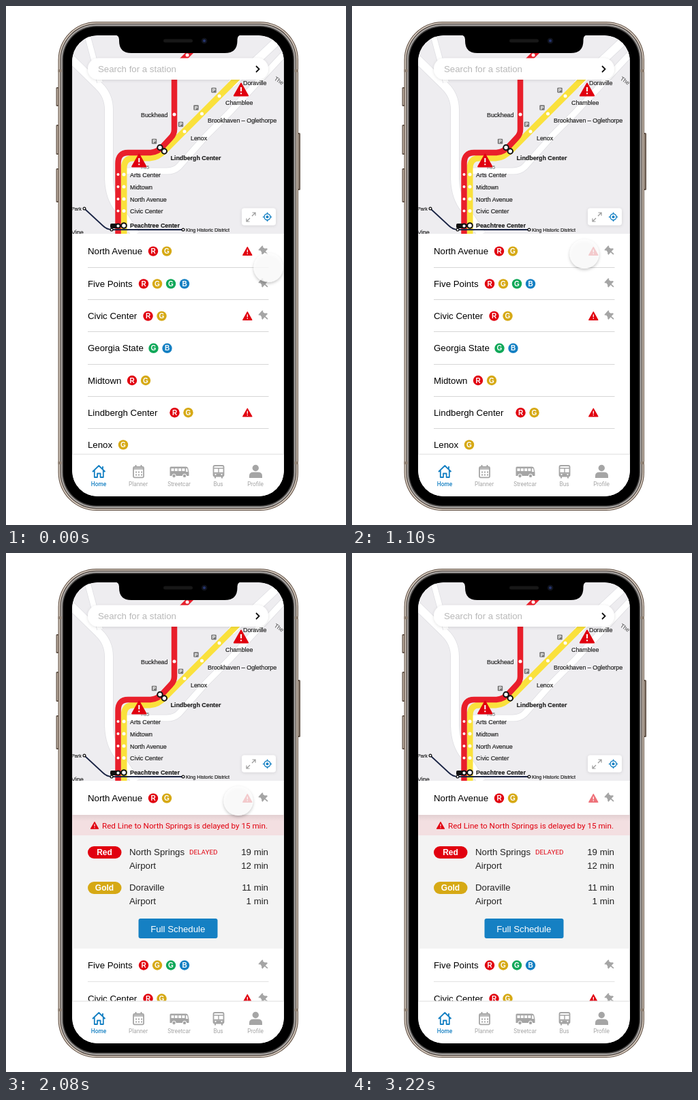
Write an HTML page that moves like this. It is 499 px wide and 761 px high and loops after 3800 ms.

```html
<!DOCTYPE html>
<html lang="en">
<head>
<meta charset="utf-8">
<title>Station list</title>
<style>
html, body { margin: 0; width: 100%; height: 100%; overflow: hidden; background: #fff; }
svg { display: block; width: 499px; height: 761px; font-family: "Liberation Sans", Arial, sans-serif; }
.ui { font-size: 13.25px; }
.map { font-size: 8.9px; fill: #222; stroke: #222; stroke-width: .2px; }
.b { font-weight: bold; }
.mid { text-anchor: middle; }
.end { text-anchor: end; }
.rb { font-family: Roboto, sans-serif; }
</style>
</head>
<body>
<svg id="stage" viewBox="0 0 499 761"></svg>
<script>
const RED = '#e1000f', GOLD = '#d6a915', GREEN = '#10a859', BLUE = '#1580c3', GREY = '#a5a5a5';
const LINE = { R: ['R', RED], Y: ['G', GOLD], G: ['G', GREEN], B: ['B', BLUE] };

const text = (x, y, s, cls = 'ui', attr = '') => `<text x="${x}" y="${y}" class="${cls}" ${attr}>${s}</text>`;
const rect = (x, y, w, h, r, fill, attr = '') =>
  `<rect x="${x}" y="${y}" width="${w}" height="${h}" rx="${r}" fill="${fill}" ${attr}/>`;
const dot = (x, y, r, fill, attr = '') => `<circle cx="${x}" cy="${y}" r="${r}" fill="${fill}" ${attr}/>`;
const path = (d, stroke, w, attr = '') =>
  `<path d="${d}" fill="none" stroke="${stroke}" stroke-width="${w}" ${attr}/>`;
const shape = (d, fill, attr = '') => `<path d="${d}" fill="${fill}" ${attr}/>`;

const alertIcon = (x, y, k = 1, attr = '') => `<g transform="translate(${x} ${y}) scale(${k})" ${attr}>
  <path d="M0-6 6.6 5.7H-6.6Z" fill="${RED}" stroke="${RED}" stroke-width="1.2" stroke-linejoin="round"/>
  <path d="M0-2.4V1.7M0 2.9V4.3" stroke="#fff" stroke-width="1.3"/></g>`;
const pin = y => shape('M-4.5-7.5h9v2.2h-1.4l.7 4q2.4 1.2 2.4 3.7H.9V7L0 8.5-.9 7V2.4H-6.2q0-2.5 2.4-3.7l.7-4h-1.4Z',
  GREY, `transform="translate(378.5 ${y - .5}) rotate(-48) scale(.94)"`);
const badge = (x, y, key) => dot(x, y, 7.2, LINE[key][1]) +
  text(x, y + 3.6, LINE[key][0], 'b mid', 'font-size="10" fill="#fff"');
const rule = (y, color = '#d6d6d6') => path(`M120 ${y}H385.5`, color, 1);

function row(y, name, x, lines, warn, pinned) {
  return text(120, y + 4.6, name) +
    [...lines].map((key, i) => badge(x + i * 20, y, key)).join('') +
    (warn ? alertIcon(354.3, y) : '') + (pinned ? pin(y) : '');
}

function mapView() {
  const road = (d, w) => path(d, '#dedee2', w + 1.5) + path(d, '#fff', w);
  const red = 'M272 66 253 85Q247 91 247 99V181Q247 188 242 193L230 206Q222 214.5 212 215H179Q164.5 215 164.5 231V335';
  const gold = 'M345 100 235 210Q223 222.5 211 223H187Q173 223 173 239V335';
  const labels = [
    [198, 163, 'Buckhead'], [348, 116, 'Doraville'], [322, 145, 'Chamblee'],
    [296, 171, 'Brookhaven – Oglethorpe'], [271, 196.5, 'Lenox'], [182, 250.5, 'Arts Center'],
    [182, 268.5, 'Midtown'], [182, 286.5, 'North Avenue'], [182, 304, 'Civic Center'], [96, 335, 'Vine']
  ];
  const ring = (x, y, r, w) => dot(x, y, r, '#fff', `stroke="#111" stroke-width="${w}"`);
  const parking = ([x, y]) => rect(x - 3.7, y - 3.7, 7.4, 7.4, 1, '#777') +
    text(x, y + 2.5, 'P', 'b mid', 'font-size="7" fill="#fff"');
  return rect(97, 43, 311, 292, 0, '#eeedf0') +
    road('M90 72 136 117Q151 131 151 152V250Q151 280 166 298L190 335', 12) +
    road('M118 38 138 112', 8) +
    road('M175 242H236Q248 242 255 234L294 190Q310 174 326 158L412 66', 9) +
    road('M330 115 410 40', 12) +
    path(gold, '#fae13c', 9) + path(red, '#e91f2b', 8.5) +
    [[247, 159], [313, 132], [287.5, 158], [262, 184], [266, 72]].map(p => dot(...p, 2.5, '#fff')).join('') +
    [247, 265, 283, 300.5].map(y => dot(164.5, y, 2, '#fff') + dot(173, y, 2.5, '#fff')).join('') +
    [[305, 123.5], [279, 149], [256.5, 173.5], [217.5, 198.5]].map(parking).join('') +
    path('M228 209 231 212', '#111', 4) + ring(226, 207.5, 3.7, 2) + ring(232.3, 213, 3.7, 2) +
    path('M115 297 142 322Q148 328 156 328H260', '#1b2545', 1.8) +
    rect(153, 319, 13, 7, 2, '#111') + path('M164 322H173', '#111', 4) +
    ring(164.5, 322.5, 3, 1.8) + ring(173, 322, 3.8, 2) +
    [[115, 297], [155, 328], [260, 328]].map(p => ring(...p, 1.9, 1.2)).join('') +
    labels.map(a => text(...a, 'map')).join('') +
    text(241.5, 226, 'Lindbergh Center', 'map b') + text(182, 325, 'Peachtree Center', 'map b') +
    text(264, 331, 'King Historic District', 'map', 'style="font-size:7.15px"') +
    text(96, 300, 'Park', 'map', 'style="font-size:7.2px"') +
    text(198, 239, 'I-85', '', 'font-size="7" fill="#666"') +
    text(393, 108, 'The P', '', 'font-size="8.5" fill="#444" transform="rotate(33 393 108)"') +
    alertIcon(345, 122.7, 1.55) + alertIcon(195.3, 226.7, 1.55) +
    rect(346, 296.5, 50, 25, 4, '#fff', 'filter="url(#soft)"') +
    path('M361 308 366 303M361.5 303H366V307.5M358 311 353 316M353 311.5V316H357.5', '#999', 1.2) +
    path('M383.5 302.5V305M383.5 313.5V316M376.8 309.3H379.3M387.7 309.3H390.2', BLUE, 1.3) +
    dot(383.5, 309.3, 4.5, 'none', `stroke="${BLUE}" stroke-width="1.4"`) + dot(383.5, 309.3, 2, BLUE) +
    rect(120, 76.5, 265, 31.5, 15.7, '#fff', 'filter="url(#soft)"') +
    text(135, 97, 'Search for a station', 'ui', 'fill="#b8b8b8"') +
    path('M367 88 371.5 92.5 367 97', '#111', 1.8);
}

function closedList() {
  const rows = [
    ['Five Points', 202, 'RYGB', 0, 1], ['Civic Center', 208.5, 'RY', 1, 1], ['Georgia State', 216.5, 'GB'],
    ['Midtown', 185, 'RY'], ['Lindbergh Center', 247.5, 'RY', 1], ['Lenox', 172, 'Y']
  ];
  return rows.map((r, i) => row(407.4 + 47.2 * i, ...r) + (i < 5 ? rule(430.5 + Math.round(47.3 * i)) : '')).join('') +
    rule(383.5);
}

function openList() {
  const pill = (y, s, fill) => rect(120, y, 49.5, 18, 9, fill) +
    text(144.5, y + 13.3, s, 'b mid', 'font-size="12" fill="#fff"');
  const trains = [[443, 'North Springs', 19], [463, 'Airport', 12], [494.5, 'Doraville', 11], [514.5, 'Airport', 1]];
  return rect(97, 384, 311, 196, 0, '#f3f3f3') + rect(97, 384, 311, 30, 0, '#f3dfe1') +
    rect(97, 384, 311, 9, 0, 'url(#shade)') +
    alertIcon(130, 399.5, .85) +
    text(141, 403.5, 'Red Line to North Springs is delayed by 15 min.', 'rb', `font-size="11.65" fill="${RED}"`) +
    pill(430, 'Red', RED) + pill(482, 'Gold', GOLD) +
    trains.map(([y, to, min]) => text(181, y, to, 'ui', 'fill="#222"') + text(385, y, min + ' min', 'ui end', 'fill="#222"')).join('') +
    text(269, 442, 'DELAYED', 'rb', `font-size="9.9" fill="${RED}"`) +
    rect(194.5, 536, 116, 29, 3, BLUE) + text(252.3, 556, 'Full Schedule', 'ui mid', 'fill="#fff"') +
    row(604.5, 'Five Points', 202, 'RYGB', 0, 1) + rule(628.5, '#e2e2e2') +
    row(653.5, 'Civic Center', 208.5, 'RY', 1, 1);
}

function tabBar() {
  const tabs = [[136, 'Home'], [194, 'Planner'], [254, 'Streetcar'], [311.5, 'Bus'], [366, 'Profile']];
  return rect(97, 657, 311, 63, 0, '#fff') + rect(97, 656.5, 311, 1.5, 0, '#e9e9e9') +
    path('M127 683 136.3 674 145.5 683M129.8 681V691H134V685.5H138.6V691H142.8V681M142 675V678.5', BLUE, 1.8, 'stroke-linejoin="round"') +
    rect(187, 676, 15, 15.3, 1.5, 'none', `stroke="${GREY}" stroke-width="1.8"`) +
    path('M187 678.5H202M190.5 673V677M198.5 673V677', GREY, 2) +
    path('M190 683.5H200M190 687.5H200', GREY, 2, 'stroke-dasharray="2"') +
    shape('M242 675.5H264Q267 675.5 267.5 679L268.5 684V689H240.5V677Q240.5 675.5 242 675.5Z', GREY) +
    path('M242.5 680H263', '#fff', 4, 'stroke-dasharray="4 1.3"') + shape('M264 678H266L267 683H264Z', '#fff') +
    [246.5, 262].map(x => dot(x, 689, 2.7, GREY, 'stroke="#fff" stroke-width="1"')).join('') +
    rect(304.5, 674, 15, 15.5, 2, 'none', `stroke="${GREY}" stroke-width="1.8"`) +
    path('M304.5 677.7H319.5M304.5 684.5H319.5', GREY, 1.6) + path('M312 678V684', GREY, 1.4) +
    path('M304.5 687.3H319.5', GREY, 4) + dot(307.5, 687, 1.1, '#fff') + dot(316.5, 687, 1.1, '#fff') +
    path('M307 689V692.5M317 689V692.5', GREY, 2) +
    dot(366.3, 677.5, 4.7, GREY) + shape('M357 692V689Q357 683.5 363 683.5H370Q376 683.5 376 689V692Z', GREY) +
    tabs.map(([x, s], i) => text(x, 704.3, s, 'rb mid', `font-size="8.3" fill="${i ? GREY : BLUE}" ${i ? '' : 'font-weight="500"'}`)).join('');
}

function phone() {
  const buttons = [[73.5, 119, 28], [73.5, 174, 44], [73.5, 238, 50], [427, 186, 84]];
  const rims = [[0, '#6a5a4e'], [1.2, '#ded3c8'], [2.8, '#4b413b'], [4, '#aaa7a5'], [6, '#484645'], [7.5, '#000']];
  return buttons.map(([x, y, h]) => rect(x, y, 5, h, 1.5, '#65574c') + rect(x + 1.3, y + 2, 1.5, h - 4, 0, '#c9bbad')).join('') +
    rims.map(([d, fill]) => rect(76.5 + d, 23 + d, 352.5 - 2 * d, 717 - 2 * d, 56 - d, fill)).join('') +
    [[76.5, 93], [424, 93], [76.5, 668], [424, 668]].map(([x, y]) => rect(x, y, 5, 4, 0, '#8d7e70')).join('');
}

const notch = shape('M159 42Q166 43 166 49V51Q166 69 184 69H321Q339.5 69 339.5 51V49Q339.5 43 346 42Z', '#000') +
  rect(231, 48.5, 43, 5, 2.5, '#171717') + dot(291, 51, 4.3, '#10131d') + dot(291, 51, 2, '#26366f');

const stage = document.getElementById('stage');
stage.innerHTML = `<defs>
  <clipPath id="screen">${rect(97.3, 43.3, 310.4, 675.5, 37, '#000')}</clipPath>
  <linearGradient id="shade" x2="0" y2="1"><stop stop-opacity=".07"/><stop offset="1" stop-opacity="0"/></linearGradient>
  <filter id="soft" x="-30%" y="-30%" width="160%" height="170%"><feDropShadow dx="0" dy="1" stdDeviation="2" flood-opacity=".12"/></filter>
  <filter id="lift" x="-30%" y="-30%" width="160%" height="170%"><feDropShadow dx="0" dy="2" stdDeviation="2" flood-opacity=".3"/></filter>
  </defs>${phone()}
  <g clip-path="url(#screen)">${rect(97, 43, 311, 676, 0, '#fff')}${mapView()}
    ${rect(97, 334, 311, 386, 0, '#fff')}
    <g id="closed">${closedList()}</g><g id="open">${openList()}</g>
    ${row(359.6, 'North Avenue', 216, 'RY', 0, 1)}
    ${alertIcon(354.3, 359.6, 1, 'id="warn"')}
    ${rect(337, 382.5, 8, 2, 0, '#fff', 'id="gap"')}
    ${tabBar()}
    <g id="cursor">${dot(0, 0, 21.5, '#fff', 'fill-opacity=".76" filter="url(#lift)"')}</g>
  </g>${notch}`;

const el = id => document.getElementById(id);
const [closed, open, warn, gap, cursor] = ['closed', 'open', 'warn', 'gap', 'cursor'].map(el);
const ramp = (t, a, b) => {
  const u = Math.min(1, Math.max(0, (t - a) / (b - a)));
  return u * u * (3 - 2 * u);
};
const curve = (s, a, b, c) => (1 - s) ** 2 * a + 2 * s * (1 - s) * b + s * s * c;

function draw(now) {
  const t = now % 3800;
  const s = ramp(t, 140, 860);
  const seen = 1 - ramp(t, 1200, 1400) + ramp(t, 1440, 1600) - ramp(t, 2760, 2960);
  const opened = t >= 1540;
  cursor.setAttribute('transform', `translate(${curve(s, 385, 359, 341)} ${curve(s, 383.5, 360, 363.5)})`);
  cursor.setAttribute('opacity', seen);
  warn.setAttribute('opacity', .55 + .45 * seen);
  closed.style.display = opened ? 'none' : '';
  open.style.display = opened ? '' : 'none';
  gap.style.display = t >= 1000 && !opened ? '' : 'none';
  requestAnimationFrame(draw);
}
draw(performance.now());
</script>
</body>
</html>
```
